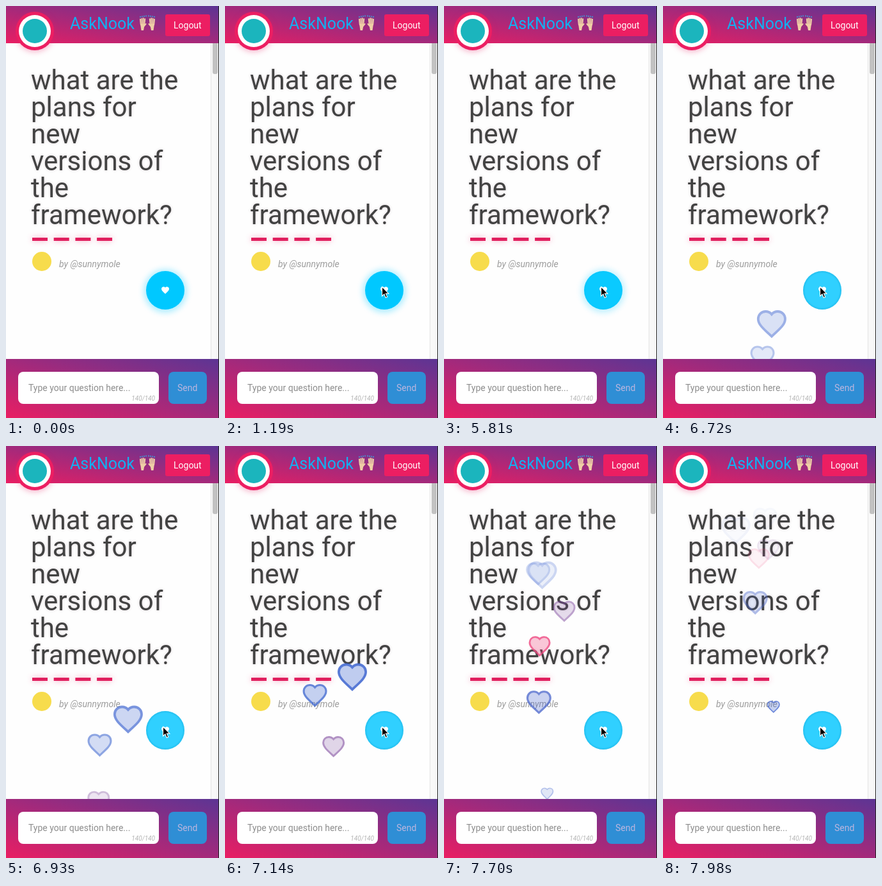
Animation of 333x642 px, one loop 8000 ms. Source, as an HTML page:

```html
<!DOCTYPE html>
<html lang="en">
<head>
<meta charset="utf-8">
<title>Question board</title>
<style>
  html, body { margin: 0; height: 100%; overflow: hidden; background: #fff; }
  svg { display: block; width: 100vw; height: 100vh; font-family: Roboto, sans-serif; font-size: 14px; }
  .question { font-size: 42px; fill: #424242; text-shadow: 0 0 4px rgba(90, 50, 70, .2); }
  .badge { filter: drop-shadow(0 2px 5px rgba(233, 30, 99, .35)); }
  .dashes { filter: drop-shadow(0 0 5px rgba(233, 30, 99, .4)); }
  .glow { filter: blur(5px); }
  .muted { font-style: italic; fill: #9c9c9c; }
</style>
</head>
<body>
<svg viewBox="0 0 333 642">
  <defs>
    <linearGradient id="bar" x1="0" y1="1" x2="1" y2="0">
      <stop offset="0" stop-color="#e91e63"/>
      <stop offset="1" stop-color="#5c3594"/>
    </linearGradient>
    <path id="heart" d="M0 9C-6-3-10 3-10-4C-10-11-2-11 0-7"/>
    <radialGradient id="rim">
      <stop offset=".88" stop-color="#0c9fd0" stop-opacity="0"/>
      <stop offset="1" stop-color="#0c9fd0"/>
    </radialGradient>
  </defs>

  <rect width="333" height="642" fill="#fefefe"/>
  <path d="M320.5 58v492" stroke="#e4e4e4"/>
  <rect x="321" y="58" width="11" height="492" fill="#f8f8f8"/>
  <rect x="323" y="52" width="8" height="54" rx="3" fill="#c2c2c2"/>

  <g id="question" class="question"></g>
  <path class="dashes" d="M41 363.5H166" fill="none" stroke="#e01f5e" stroke-width="5" stroke-dasharray="24 9.7"/>
  <circle cx="56" cy="398" r="15" fill="#f7dc4c"/>
  <text class="muted" x="83" y="407">by @sunnymole</text>

  <circle id="glow" class="glow" cx="249" cy="444" r="34" fill="#00c8ff"/>
  <circle id="button" cx="249" cy="443" r="30"/>
  <circle id="inset" cx="249" cy="443" r="30" fill="url(#rim)"/>
  <use href="#heart" transform="translate(249 443) scale(.6)" fill="#fff"/>

  <g id="hearts"></g>

  <rect width="333" height="58" fill="url(#bar)"/>
  <g class="badge">
    <circle cx="45" cy="39" r="30" fill="#ec1e62"/>
    <circle cx="45" cy="39" r="25" fill="#fff"/>
  </g>
  <circle cx="45" cy="39" r="19" fill="#1bb5bd"/>
  <text x="100" y="36" font-size="25" fill="#12b0f2">AskNook</text>
  <g id="hands" stroke-linecap="round"></g>
  <rect x="249" y="13" width="70" height="34" rx="3" fill="#ec1e62"/>
  <text x="262" y="35" fill="#fff">Logout</text>

  <rect y="550" width="333" height="92" fill="url(#bar)"/>
  <rect x="19" y="570" width="220" height="50" rx="8" fill="#fff"/>
  <text x="35" y="599.5" fill="#8d8d8d">Type your question here...</text>
  <text class="muted" x="233" y="615" font-size="10" text-anchor="end" fill-opacity=".75">140/140</text>
  <rect x="254" y="570" width="60" height="50" rx="8" fill="#2f8ed5"/>
  <text x="268" y="600" fill="#bdb6de">Send</text>
  <path d="M332.5 0v642" stroke="#222"/>

  <path id="cursor" d="M0 0V14.5L3.4 11.5 5.7 17 8.2 16 5.9 10.6H10.4Z" stroke="#fff" stroke-width="1.1"/>
</svg>
<script>
const LOOP = 8000;
const SVG = 'http://www.w3.org/2000/svg';
const $ = id => document.getElementById(id);
const clamp = v => Math.max(0, Math.min(1, v));
const mix = (a, b, p) => a + (b - a) * p;

function add(parent, tag, attrs) {
  const node = document.createElementNS(SVG, tag);
  for (const key in attrs) node.setAttribute(key, attrs[key]);
  return parent.appendChild(node);
}

$('heart').setAttribute('d',
  'M0 9.2L-1.5 7.8C-6.6 3.2-10 .1-10-3.7C-10-6.8-7.6-9.2-4.5-9.2C-2.8-9.2-1.1-8.4 0-7.1' +
  'C1.1-8.4 2.8-9.2 4.5-9.2C7.6-9.2 10-6.8 10-3.7C10 .1 6.6 3.2 1.5 7.8Z');

['what are the', 'plans for', 'new', 'versions of', 'the', 'framework?'].forEach((line, i) => {
  add($('question'), 'text', { x: 39, y: 130 + 42 * i }).textContent = line;
});

// Two raised hands, mirrored about their common centre line
for (const side of [-1, 1]) {
  const hand = add($('hands'), 'g', { transform: `translate(221 0) scale(${side} 1)` });
  add(hand, 'path', { d: 'M4 28H11L9.5 38H6Z', fill: '#efcfa6' });
  for (let i = 0; i < 4; i++) {
    const tip = 19 + Math.abs(i - 1.3);
    add(hand, 'path', { d: `M${4.8 + 1.8 * i} 29L${3.8 + 2.4 * i} ${tip}`, stroke: '#efcfa6', 'stroke-width': 2 });
    add(hand, 'path', { d: `M${2 + 3 * i} ${15 + i / 2}v1`, stroke: '#30b8ec', 'stroke-width': 1.3 });
  }
  add(hand, 'path', { d: 'M6 32L2.5 28', stroke: '#efcfa6', 'stroke-width': 2 });
}

// Every heart shares one rise, sway and fade; these set its pace and place
const hearts = [
  { birth: 6490, x: 138, sway: 61, speed: .358, width: 46, color: '#3f66d0' },
  { birth: 6648, x: 159, sway: -20, speed: .40, width: 38, color: '#4068d0' },
  { birth: 6878, x: 138, sway: 54, speed: .42, width: 35, color: '#7c479c' },
  { birth: 7193, x: 128, sway: 23, speed: .54, width: 34, color: '#ee4a82' },
  { birth: 7395, x: 157, sway: -13, speed: .59, width: 39, color: '#4a66cc' },
  { birth: 7632, x: 158, sway: 20, speed: .50, width: 20, color: '#3a5fcd' }
];
for (const heart of hearts) {
  heart.node = add($('hearts'), 'use', {
    href: '#heart', fill: heart.color, 'fill-opacity': .38, stroke: heart.color, 'stroke-width': 1.8
  });
}

function drawHeart({ node, birth, x, sway, speed, width }, t) {
  const age = t - birth;
  const rise = speed * age - .00004 * age * age;
  const y = 576 - rise;
  const fadeIn = .3 + .62 * rise / 236;
  const fadeOut = clamp((y - 60) / 280) ** 2;
  node.setAttribute('opacity', age < 0 ? 0 : Math.min(fadeIn, fadeOut));
  node.setAttribute('transform',
    `translate(${x + sway * Math.sin(age / 420)} ${y}) scale(${width / 21.8})`);
}

function draw(t) {
  const travel = clamp((t - 70) / 770);
  const ease = travel * travel * (3 - 2 * travel);
  $('cursor').setAttribute('transform',
    `translate(${mix(146, 245.5, ease)} ${mix(-20, 437.5, ease)})`);

  const press = clamp((t - 5740) / 350);
  $('button').setAttribute('fill', `rgb(${mix(0, 48, press)} ${mix(200, 208, press)} 255)`);
  $('glow').setAttribute('opacity', mix(.3, 0, press));
  $('inset').setAttribute('opacity', .35 * press);

  hearts.forEach(heart => drawHeart(heart, t));
}

const start = performance.now();
function frame() {
  draw((performance.now() - start) % LOOP);
  requestAnimationFrame(frame);
}
frame();
</script>
</body>
</html>
```
